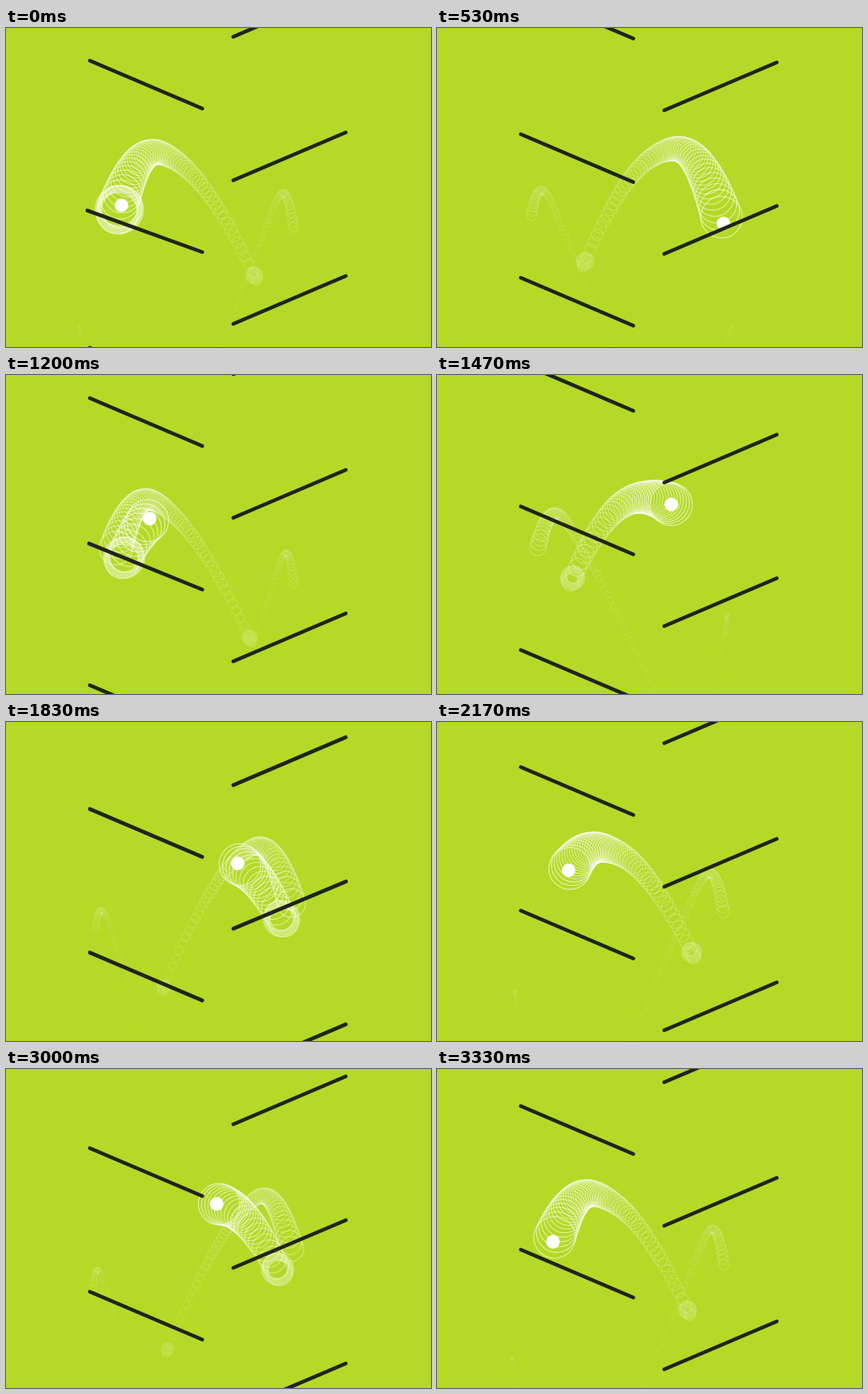
Animation, 480 px wide and 360 px high, one loop 3360 ms. Source, as an HTML page with a canvas:

```html
<!DOCTYPE html>
<html lang="en">
<head>
<meta charset="utf-8">
<title>Bouncing ball</title>
<style>
html, body { margin: 0; width: 100%; height: 100%; overflow: hidden; background: #b4da27; }
canvas { display: block; width: 480px; height: 360px; }
</style>
</head>
<body>
<canvas id="stage" width="480" height="360"></canvas>
<script>
const ctx = document.getElementById('stage').getContext('2d');
const LOOP = 3360, GAP = 162, HOP = GAP / 2;
const RATE = 56;        // rings per hop
const LIFE = 2.4;       // ring lifetime in hops
const LAG = 0.01;       // delay of the shock ring after a hit
const BAR = 138, TILT = Math.atan2(54, 127);

// Scroll distance over time; the pace drifts slightly.
const PACE = [[0, 0], [530, 79], [930, 133], [1470, 212.5], [2170, 310], [2670, 386], [3330, 481], [LOOP, 6 * HOP]];

function scrollAt(t) {
  const i = PACE.findIndex(p => p[0] > t);
  const [t0, s0] = PACE[i - 1], [t1, s1] = PACE[i];
  return s0 + (s1 - s0) * (t - t0) / (t1 - t0);
}

// Ball position after v hops; even hops go right, odd hops go left.
function ballAt(v) {
  const hop = Math.floor(v), e = v - hop;
  const right = hop % 2 === 0;
  const run = 199 * (1.25 * e - 0.25 * e * e);
  const rise = 1 - Math.abs(2 * e - 1) ** 3;
  return {
    e,
    dir: right ? 1 : -1,
    x: right ? 125 + run : 324 - run,
    y: right ? 209 + 13 * e - 73 * rise : 222 - 13 * e - 66 * rise
  };
}

// Rings drift away from where they were left, then fall, shrinking as they age.
function drawRing(v, age, width, alpha) {
  const b = ballAt(v), e = b.e;
  const q = Math.min(1, e * 1.25);
  const vx = b.dir * (40 - 30 * e + 65 * e * (1 - e)) - 9 * e;
  const vy = -52 * q * q * (3 - 2 * q);
  ctx.globalAlpha = alpha;
  ctx.lineWidth = width;
  ctx.beginPath();
  ctx.arc(b.x + vx * age, b.y + vy * age + 60 * age * age, 24 * Math.exp(-1.4 * age), 0, 7);
  ctx.stroke();
}

// Each bar hinges at its inner end and dips when hit.
function drawBar(x, y, side, age) {
  const dip = age >= 0 ? 0.068 * Math.exp(-9 * age) : 0;
  const angle = TILT - dip;
  ctx.beginPath();
  ctx.moveTo(x, y);
  ctx.lineTo(x - side * BAR * Math.cos(angle), y - BAR * Math.sin(angle));
  ctx.stroke();
}

function draw(t) {
  const s = scrollAt(t), now = s / HOP + 0.02;

  ctx.globalAlpha = 1;
  ctx.fillStyle = '#b4da27';
  ctx.fillRect(0, 0, 480, 360);

  ctx.strokeStyle = '#fff';
  for (let k = Math.ceil((now - LIFE) * RATE); k <= now * RATE; k++) {
    const age = now - k / RATE;
    drawRing(k / RATE, age, 1.1, 0.62 * Math.exp(-1.25 * age));
  }
  for (let k = Math.ceil(now - LIFE); k + LAG <= now; k++) {
    const age = now - k - LAG;
    drawRing(k + LAG, age, 8.5, 0.48 * Math.exp(-0.9 * age));
  }

  const b = ballAt(now);
  ctx.globalAlpha = 1;
  ctx.fillStyle = '#fff';
  ctx.beginPath();
  ctx.arc(b.x, b.y, 7.7, 0, 7);
  ctx.fill();

  ctx.strokeStyle = '#22221e';
  ctx.lineWidth = 4.2;
  ctx.lineCap = 'round';
  for (let j = -1; j < 6; j++) {
    const hit = 2 * (j - 1);
    drawBar(221.7, 91 + GAP * j - s, 1, now - hit);
    drawBar(256.7, 172 + GAP * j - s, -1, now - hit - 1);
  }
}

const start = performance.now();
function tick() {
  draw((performance.now() - start) % LOOP);
  requestAnimationFrame(tick);
}
tick();
</script>
</body>
</html>
```
